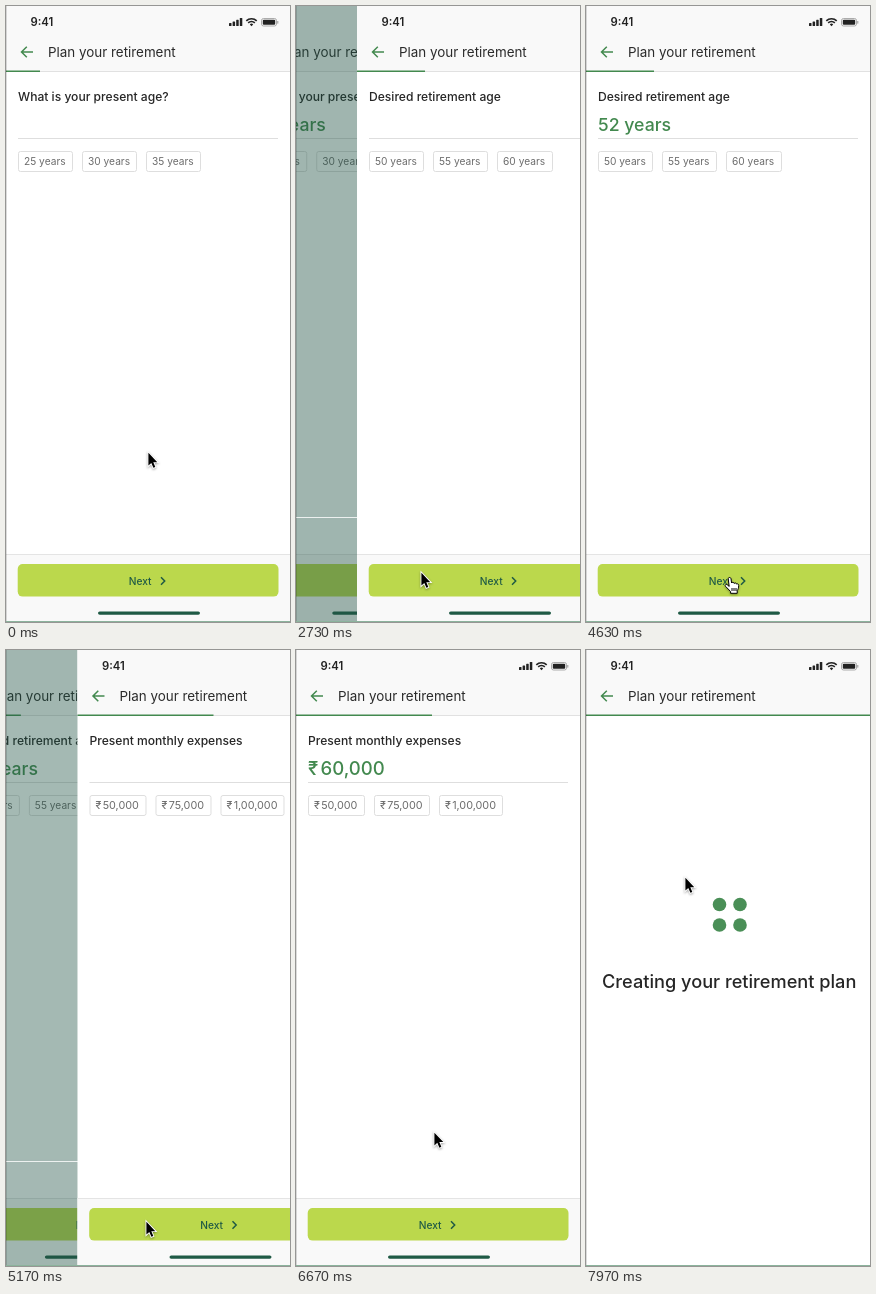
An HTML page for the animation above (8000 ms loop, 284x616 px).

```html
<!DOCTYPE html>
<html lang="en">
<head>
<meta charset="utf-8">
<title>Plan your retirement</title>
<style>
  html, body { margin: 0; width: 100%; height: 100%; overflow: hidden; background: #fff; }
  svg { display: block; width: 284px; height: 616px; font-family: Inter, "Open Sans", sans-serif; }
  .title { font-size: 13.4px; fill: #2b2b2b; }
  .label { font-size: 12.1px; font-weight: 500; fill: #262626; }
  .value { font-size: 17.7px; font-weight: 500; fill: #43894f; }
  .chip { font-size: 10.2px; fill: #6c6c6c; }
  .money .value { font-size: 18.6px; }
  .money .chip { font-size: 10.8px; }
  .next { font-size: 10.2px; font-weight: 500; fill: #1f5a45; }
  .clock { font-size: 11.3px; font-weight: 600; fill: #222; }
  .loading { font-size: 18.2px; font-weight: 500; fill: #262626; }
</style>
</head>
<body>
<svg id="stage" viewBox="0 0 284 616"></svg>
<script>
const LOOP = 8000, W = 284, SLIDE = 600;
const GREEN = '#43894f', PINE = '#1f5a45', SHADE = '#1f5244';

const forms = [
  { ask: 'What is your present age?', value: '29 years', entered: 1070, bar: 34,
    chips: [[12, 55, '25 years'], [76, 55, '30 years'], [140, 55, '35 years']] },
  { ask: 'Desired retirement age', value: '52 years', entered: 3570, bar: 68,
    chips: [[12, 55, '50 years'], [76, 55, '55 years'], [140, 56, '60 years']] },
  { ask: 'Present monthly expenses', value: '₹60,000', entered: 6130, bar: 136, kind: 'money',
    chips: [[12, 57, '₹50,000'], [78, 56, '₹75,000'], [143, 64, '₹1,00,000']] }
];
const slideStarts = [2371, 4834, 7230];

// Cursor moves: start, end, target x, target y, sideways bow
const cursorStart = [142, 446];
const moves = [
  [30, 840, 44, 115, -12],
  [1200, 2046, 125, 566, -19],
  [2760, 3250, 48, 116, -8],
  [3620, 4460, 140, 571, 0],
  [5290, 5950, 60, 117, -8],
  [6200, 6858, 150, 571, 9],
  [7480, 7970, 99, 227, 0]
];
const handTimes = [[870, 1070], [2000, 2371], [3250, 3570], [4400, 4834], [5950, 6130], [6820, 7230]];

const rect = (x, y, w, h, fill, extra = '') =>
  `<rect x="${x}" y="${y}" width="${w}" height="${h}" fill="${fill}" ${extra}/>`;
// The rupee sign keeps a small gap to its digits
const text = (cls, x, y, str) =>
  `<text class="${cls}" x="${x}" y="${y}">${str.replace('₹', '₹<tspan dx=".12em">') + (str.includes('₹') ? '</tspan>' : '')}</text>`;
const line = (d, color, width) =>
  `<path d="${d}" fill="none" stroke="${color}" stroke-width="${width}"/>`;

function header(bar) {
  const signal = [3, 4.5, 6.2, 8].map((h, i) => rect(223 + i * 3.6, 20 - h, 2.5, h, '#222', 'rx=".6"')).join('');
  const wifi = line('M240.3 14.9a7.2 7.2 0 0 1 10.4 0M242.2 16.9a4.6 4.6 0 0 1 6.6 0', '#222', 1.6)
    + '<path d="M243.8 18.4a2.4 2.4 0 0 1 3.4 0l-1.7 1.8z" fill="#222"/>';
  const battery = rect(255.5, 12.5, 15, 7.5, 'none', 'rx="2" stroke="#999" stroke-width=".8"')
    + rect(256.8, 13.8, 12.4, 4.9, '#222', 'rx="1"') + rect(271.3, 15, 1, 2.6, '#999');
  return rect(0, 0, W, 65, '#f9f9f9') + rect(0, 65, W, 1, '#e1e1e1')
    + text('clock', 24.5, 20, '9:41') + signal + wifi + battery
    + line('M27 46H15.5M20.8 40.8L15.5 46l5.3 5.2', GREEN, 1.5)
    + text('title', 42, 51, 'Plan your retirement')
    + rect(0, 64.5, bar, 1.5, GREEN);
}

function footer() {
  return rect(0, 548, W, 68, '#f9f9f9') + rect(0, 548, W, 1, '#e4e4e4')
    + rect(11.7, 558, 260.8, 32.6, '#bbd84c', 'rx="5"')
    + text('next', 122.8, 578.7, 'Next')
    + line('M155 571.3l3.7 3.7-3.7 3.7', PINE, 1.5)
    + rect(92, 605.4, 102, 3.4, PINE, 'rx="1.7"');
}

function formPage(f) {
  const chips = f.chips.map(([x, w, str]) =>
    rect(x + .5, 145.5, w - 1, 20, '#fff', 'rx="2" stroke="#dedede"')
    + text('chip', x + 6, 159.4, str)).join('');
  return rect(0, 0, W, 616, '#fff') + header(f.bar) + text('label', 12, 95.3, f.ask)
    + `<g class="entry">${text('value', 12, 124.9, f.value)}</g>`
    + rect(12, 132, 260, 1, '#dedede') + chips + footer()
    + `<g class="scrim" opacity="0">${rect(0, 0, W, 511, SHADE)}${rect(0, 511.8, W, 105, SHADE)}</g>`;
}

function loadingPage() {
  const dots = [[133.5, 254.5], [154, 254.5], [133.5, 275], [154, 275]]
    .map(([x, y]) => `<circle cx="${x}" cy="${y}" r="6.8" fill="#4a8f57"/>`).join('');
  return rect(0, 0, W, 616, '#fff') + header(W) + dots
    + text('loading', 16, 337.5, 'Creating your retirement plan');
}

const arrow = `<path id="arrow" d="M.4.8V13.6L3.3 10.9 5.4 15.8 7.3 15 5.3 10.2H9.3Z"
  fill="#000" stroke="#fff" stroke-width="1.8" paint-order="stroke"/>`;
const hand = `<path id="hand" d="M2.2 1.7C2.2.1 4.8.1 5 1.7L5.6 6C6 5 8 5 8.2 6.5 8.8 5.6 10.4 5.9 10.6 7.1
  11.4 6.4 12.8 7 12.7 8.5 12.6 11 12.2 12.2 11.2 13.6V16.3H4.6V14.6C3 13 1.6 11.2-.6 9.2-1.5 8 .2 6.8 1.5 8L3.2 9.4Z
  M6 11v3M8 11v3M10 11v3" fill="#fff" stroke="#000" stroke-width="1" stroke-linejoin="round"/>`;

const stage = document.getElementById('stage');
const pageGroup = (body, kind = '') => `<g class="page ${kind}">${body}</g>`;
stage.innerHTML = forms.map(f => pageGroup(formPage(f), f.kind)).join('') + pageGroup(loadingPage())
  + rect(0, 0, 1, 616, '#000', 'opacity=".14"') + rect(0, 615, W, 1, '#8cb39c')
  + `<g id="cursor" style="filter:drop-shadow(0 1px 1px rgba(0,0,0,.35))">${arrow}${hand}</g>`;

const pages = [...stage.querySelectorAll('.page')];
const entries = [...stage.querySelectorAll('.entry')];
const scrims = [...stage.querySelectorAll('.scrim')];
const [cursor, arrowEl, handEl] = ['cursor', 'arrow', 'hand'].map(id => document.getElementById(id));

const clamp = v => Math.min(1, Math.max(0, v));
const smooth = u => u * u * (3 - 2 * u);

// cubic-bezier(0, 0, .58, 1)
function easeOut(x) {
  let lo = 0, hi = 1;
  for (let i = 0; i < 24; i++) {
    const s = (lo + hi) / 2;
    if (1.74 * (1 - s) * s * s + s * s * s < x) lo = s; else hi = s;
  }
  return x <= 0 ? 0 : x >= 1 ? 1 : smooth(lo);
}

function cursorAt(t) {
  let [x, y] = cursorStart;
  for (const [from, to, tx, ty, bow] of moves) {
    if (t < from) break;
    const k = smooth(clamp((t - from) / (to - from)));
    x += (tx - x) * k + bow * 4 * k * (1 - k);
    y += (ty - y) * k;
  }
  return [x, y];
}

const show = (el, on) => { el.style.display = on ? '' : 'none'; };

function draw(t) {
  const enter = [1, ...slideStarts.map(s => easeOut((t - s) / SLIDE)), 0];
  pages.forEach((page, i) => {
    const p = enter[i], q = enter[i + 1];
    show(page, p > 0 && q < 1);
    page.setAttribute('transform', `translate(${W * (1 - p) - W / 4 * q})`);
    if (scrims[i]) scrims[i].setAttribute('opacity', .54 * q);
  });
  entries.forEach((e, i) => show(e, t >= forms[i].entered));
  cursor.setAttribute('transform', `translate(${cursorAt(t)})`);
  const pointing = handTimes.some(([a, b]) => t >= a && t < b);
  show(handEl, pointing);
  show(arrowEl, !pointing);
}

const start = performance.now();
function tick() {
  draw((performance.now() - start) % LOOP);
  requestAnimationFrame(tick);
}
tick();
</script>
</body>
</html>
```
